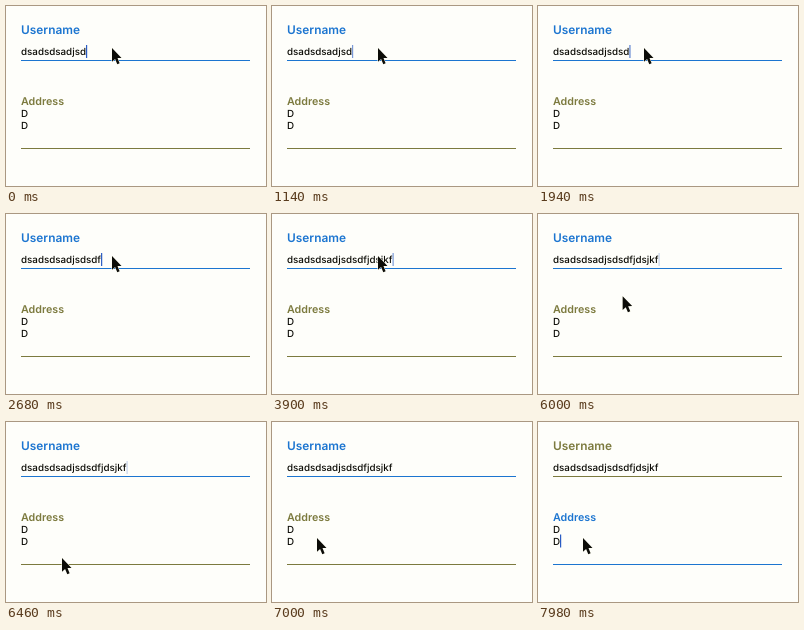
These frames come from a looping animation (260x180 px, 8 s). An HTML page:

```html
<!DOCTYPE html>
<html lang="en">
<head>
<meta charset="utf-8">
<title>Form fields</title>
<style>
html, body { margin: 0; width: 100%; height: 100%; overflow: hidden; background: #fefefa; }
svg { display: block; width: 260px; height: 180px; }
text { font: 500 9.8px Inter, "Liberation Sans", sans-serif; fill: #0c0c06; text-rendering: geometricPrecision; }
.label { font-weight: 600; }
</style>
</head>
<body>
<svg viewBox="0 0 260 180">
  <rect width="260" height="180" fill="#fefefa"/>
  <text id="userLabel" class="label" x="15" y="27.7" style="font-size:11.9px">Username</text>
  <text id="userValue" x="15" y="49.2"></text>
  <rect id="userLine" x="15" y="54" width="229" height="1"/>
  <text id="addrLabel" class="label" x="15" y="99.4" style="font-size:10.7px">Address</text>
  <text x="15" y="110.6">D</text>
  <text x="15" y="122.8">D</text>
  <rect id="addrLine" x="15" y="142" width="229" height="1"/>
  <rect id="caret" width="1.2" height="13" fill="#2a5cc4"/>
  <path id="pointer" d="M0 0V13.8L3.1 11L5.3 16.2L7.6 15.2L5.5 10.1L9.5 9.9Z"
        fill="#0c0c08" stroke="#fffff2" stroke-linejoin="round" paint-order="stroke"/>
</svg>
<script>
const LOOP = 8000;
const BLUE = [28, 117, 208], OLIVE = [124, 122, 62];
const TEXT = "dsadsdsadjsdsdfjdsjkf", START = 12;

const el = Object.fromEntries([...document.querySelectorAll("[id]")].map(e => [e.id, e]));
const mix = (a, b, k) => a + (b - a) * k;
const ramp = (t, from, to) => Math.min(1, Math.max(0, (t - from) / (to - from)));
const ease = (t, from, to) => {
  const k = ramp(t, from, to);
  return k * k * (3 - 2 * k);
};

function paint(name, k) {
  const color = `rgb(${OLIVE.map((v, i) => Math.round(mix(v, BLUE[i], k)))})`;
  el[name + "Label"].style.fill = color;
  el[name + "Line"].style.fill = color;
}

function place(node, x, y) {
  node.setAttribute("transform", `translate(${x} ${y})`);
}

// Pulses while typing, then dims and disappears
function caretAlpha(t) {
  const pulse = .8 + .2 * Math.cos(2 * Math.PI * Math.min(t, 4020) / 2680);
  return mix(pulse, .25, ramp(t, 5020, 5160)) * (1 - ramp(t, 6700, 6860));
}

function draw(t) {
  const added = Math.ceil(3 * ramp(t, 1660, 2400)) + Math.ceil(6 * ramp(t, 2900, 3860));
  const typed = TEXT.slice(0, START + added);
  if (el.userValue.textContent !== typed) el.userValue.textContent = typed;

  const focus = ramp(t, 7820, 7970);
  paint("user", 1 - focus);
  paint("addr", focus);

  const inAddress = t >= 7860;
  if (inAddress) place(el.caret, 22, 112.5);
  else place(el.caret, 15 + el.userValue.getComputedTextLength(), 39);
  el.caret.setAttribute("opacity", inAddress ? 1 : caretAlpha(t));

  const down = ease(t, 5640, 6440), back = ease(t, 6640, 7000);
  place(el.pointer, 106 - 50 * down - 11 * back, 42 + 94 * down - 20 * back);
}

const begin = performance.now();
function tick() {
  draw((performance.now() - begin) % LOOP);
  requestAnimationFrame(tick);
}
tick();
</script>
</body>
</html>
```
